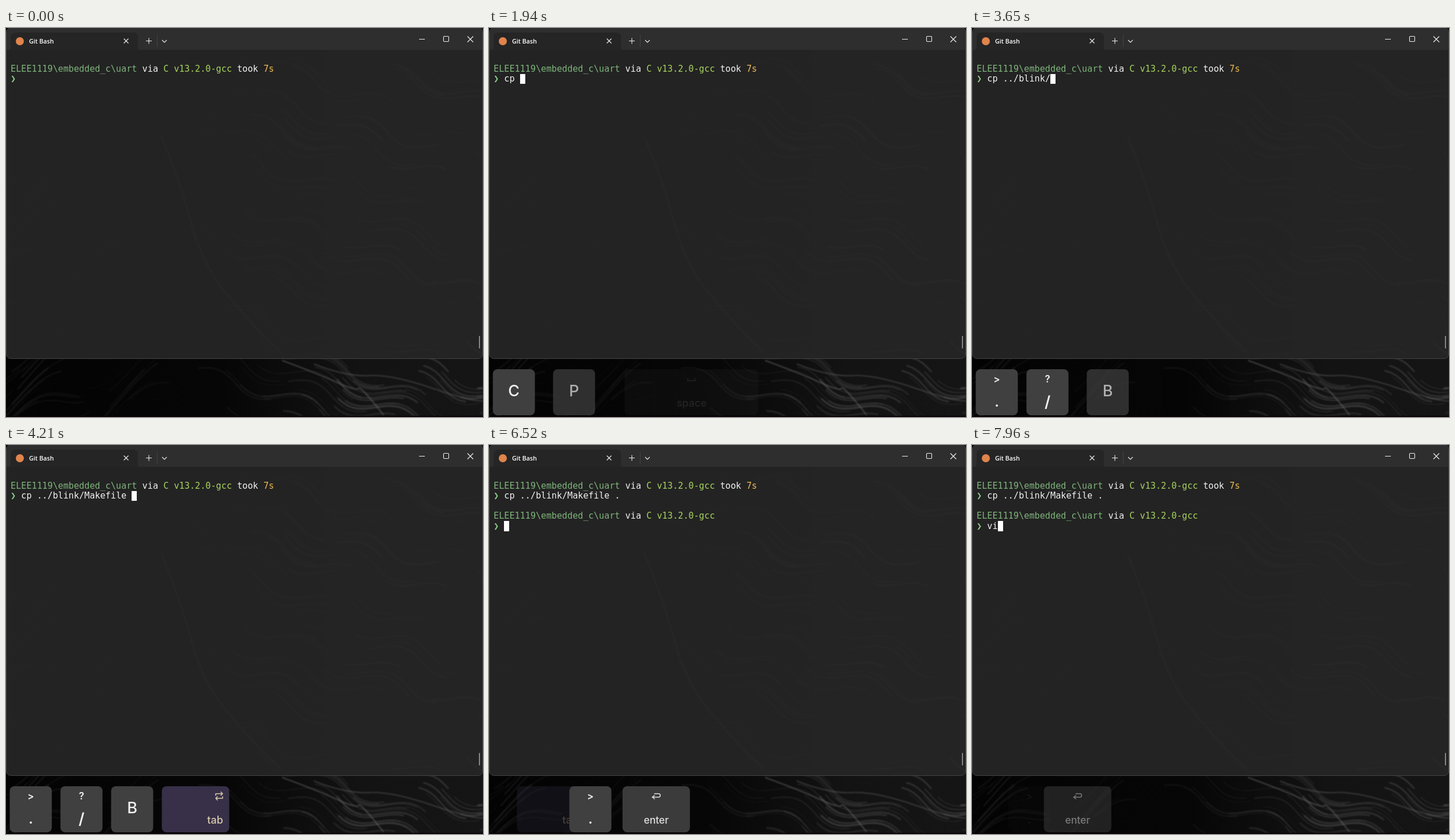
Recreate the animation shown at these times as an HTML page. Size 828 by 676 pixels, loop 8000 ms.

```html
<!DOCTYPE html>
<html lang="en">
<head>
<meta charset="utf-8">
<title>Terminal</title>
<style>
  html, body { margin: 0; width: 100%; height: 100%; overflow: hidden; background: #000; }
  svg { display: block; width: 828px; height: 676px; }
  .mono { font: 15.2px "DejaVu Sans Mono", monospace; white-space: pre; }
  .key { font-family: Inter, sans-serif; font-weight: 500; text-anchor: middle; }
  .line { fill: none; stroke: #f0f0f0; stroke-width: 1.1; }
  .icon { fill: none; stroke-width: 1.5; stroke-linecap: round; stroke-linejoin: round; }
</style>
</head>
<body>
<svg viewBox="0 0 828 676">
  <defs>
    <linearGradient id="sea">
      <stop offset="0" stop-color="#030303"/>
      <stop offset=".45" stop-color="#060606"/>
      <stop offset=".75" stop-color="#131313"/>
      <stop offset="1" stop-color="#151515"/>
    </linearGradient>
    <filter id="soft" x="0" y="0" width="828" height="676" filterUnits="userSpaceOnUse">
      <feGaussianBlur stdDeviation="1.1"/>
    </filter>
  </defs>
  <rect width="828" height="676" fill="url(#sea)"/>
  <g id="waves" fill="none" stroke-linecap="round" filter="url(#soft)"></g>
  <rect y="674" width="828" height="2" fill="#0a0306"/>

  <rect x=".5" y="-.5" width="827" height="575" rx="8" fill="#262626" fill-opacity=".94" stroke="#444"/>
  <path d="M1 38V8Q1 0 9 0H819Q827 0 827 8V38Z" fill="#2e2e2e"/>
  <path d="M4 38Q8 38 8 34V16Q8 8 16 8H221Q229 8 229 16V34Q229 38 233 38Z" fill="#252525"/>
  <circle cx="24" cy="23" r="7" fill="#e0844c"/>
  <text x="40" y="27" fill="#fff" style="font:600 10.7px 'Open Sans',sans-serif">Git Bash</text>
  <path d="M262.5 12V33" stroke="#444"/>
  <g class="line">
    <path d="M204.5 18.5l8 8m0-8l-8 8M243 22.5h10m-5-5v10M271 21l4 4l4-4"/>
    <path d="M717 19.5h10M801 14.5l10 10m0-10l-10 10"/>
    <rect x="759.5" y="14.5" width="9" height="9" rx="1.2"/>
  </g>
  <rect x="821" y="535" width="1.6" height="22" rx=".8" fill="#a0a0a0"/>

  <g id="screen" class="mono"></g>
  <g id="keys" class="key"></g>
</svg>
<script>
const LOOP = 8000, CELL = 9.15, ROW = 17.4, FADE = 300, SLIDE = 60;
const $ = id => document.getElementById(id);

// Wallpaper: seeded flow lines, brighter towards the right
let seed = 29;
const rand = () => (seed = (seed * 16807) % 2147483647) / 2147483647;

function swell(count, top, bottom, strength) {
  let out = '';
  for (let i = 0; i < count; i++) {
    let x = rand() * 860 - 20, y = top + rand() * (bottom - top);
    const width = 0.8 + rand() * 2.4, steps = 7 + Math.floor(rand() * 12);
    const light = Math.max(0.05, Math.min(1, (x - 330) / 260));
    const alpha = strength * (0.25 + 0.75 * light) * (0.4 + 0.6 * rand());
    let d = `M${x.toFixed(1)} ${y.toFixed(1)}`;
    const side = x < 300 ? -1 : 1;
    for (let s = 0; s < steps; s++) {
      const angle = 0.35 + 0.5 * Math.sin(x * 0.035 + y * 0.021);
      x += side * 11 * Math.cos(angle);
      y += 11 * Math.sin(angle);
      d += `L${x.toFixed(1)} ${y.toFixed(1)}`;
    }
    out += `<path d="${d}" stroke="#aaa" stroke-width="${width.toFixed(1)}" opacity="${alpha.toFixed(3)}"/>`;
  }
  return out;
}
$('waves').innerHTML = swell(150, 40, 560, 0.5) + swell(75, 560, 670, 0.26) +
  '<path d="M480 578Q540 600 575 616T612 626T655 672" stroke="#777" stroke-width="2" opacity=".5"/>' +
  '<path d="M535 584Q590 606 630 604T740 626T828 648" stroke="#777" stroke-width="2" opacity=".4"/>' +
  '<path d="M270 190Q300 260 322 340T388 468Q430 520 476 562" stroke="#999" stroke-width="3" opacity=".4"/>';

// Terminal text
const PATH = 'ELEE1119\\embedded_c\\uart';
const COMMAND = [
  [0, ''], [1070, 'c'], [1270, 'cp'], [1400, 'cp '], [2070, 'cp .'], [2140, 'cp ..'],
  [2280, 'cp ../'], [2920, 'cp ../b'], [3190, 'cp ../blink/'], [3720, 'cp ../blink/M'],
  [3790, 'cp ../blink/Makefile '], [5360, 'cp ../blink/Makefile .']
];
const NEXT = [[0, ''], [7680, 'v'], [7820, 'vi']];
const at = (list, t) => list.filter(([time]) => time <= t).pop()[1];
const span = (text, color) => `<tspan fill="${color}">${text}</tspan>`;
const row = (n, content) => `<text x="8" y="${76 + ROW * n}">${content}</text>`;
const heading = took => span(PATH, '#7fb57c') + span(' via ', '#f2f2f2') +
  span('C v13.2.0-gcc', '#a8d45e') + (took ? span(' took ', '#f2f2f2') + span(took, '#efbd52') : '');
const prompt = text => span('❯', '#8ccf8a') + span(' ' + text, '#f2f2f2');

function block(col, line) {
  const y = Math.round(62.6 + ROW * line), bottom = Math.round(62.6 + ROW * (line + 1));
  return `<rect x="${Math.round(8 + CELL * col)}" y="${y}" width="9" height="${bottom - y}" fill="#fff"/>`;
}

function screen(t) {
  const command = at(COMMAND, t);
  let out = row(0, heading('7s')) + row(1, prompt(command));
  if (t < 70) return out;
  if (t < 5690) return out + block(2 + command.length, 1);
  if (t < 5960) return out + block(0, 2);
  const next = at(NEXT, t);
  return out + row(3, heading()) + row(4, prompt(next)) + block(2 + next.length, 4);
}

// Key caps, drawn from their own top-left corner
const GREY = { fill: '#404040', ink: '#f2f2f2' }, PURPLE = { fill: '#373048', ink: '#d9caaa' };
const label = (x, y, size, text, weight = 500) =>
  `<text x="${x}" y="${y}" font-size="${size}" font-weight="${weight}">${text}</text>`;
const icon = (x, d, ink) => `<path class="icon" transform="translate(${x} 17)" stroke="${ink}" d="${d}"/>`;
const letter = text => ({ ...GREY, width: 73, face: label(36.5, 46.5, 27, text) });
const pair = (upper, lower, y, size) =>
  ({ ...GREY, width: 73, face: label(36.5, 23, 17, upper, 600) + label(36.5, y, size, lower, 600) });

const CAPS = {
  c: letter('C'), p: letter('P'), b: letter('B'),
  dot: pair('&gt;', '.', 65, 24),
  slash: pair('?', '/', 66, 27),
  space: { ...GREY, width: 232, face: icon(116, 'M-6.5-1v4h13v-4', GREY.ink) + label(116.5, 65, 18, 'space') },
  enter: { ...GREY, width: 117,
    face: icon(58.5, 'M-3-1l-4 3l4 3M-7 2H4Q7 2 7-1T4-4H-3', GREY.ink) + label(58.5, 65, 17.3, 'enter') },
  tab: { ...PURPLE, width: 117,
    face: icon(99.5, 'M-6-1V-4H6M3-7l3 3l-3 3M6 1V4H-6M-3 1l-3 3l3 3', PURPLE.ink) + label(92.5, 65, 18, 'tab') }
};

// x: slot, start: fade in, leave: fade out, show/end: hard limits, move: [time, new slot]
const PRESSES = [
  { cap: 'c', x: 6, start: 1650, end: 2280 },
  { cap: 'p', x: 94, start: 1745, end: 2280 },
  { cap: 'space', x: 182, start: 1876, end: 2280 },
  { cap: 'dot', x: 6, start: 2525, show: 2620, end: 4270 },
  { cap: 'slash', x: 94, start: 2870, end: 4270 },
  { cap: 'b', x: 182, start: 3455, end: 4270 },
  { cap: 'tab', x: 270, start: 3640, leave: 6330, end: 6870, move: [4270, 6], pulse: 4330 },
  { cap: 'dot', x: 139, start: 5940, show: 5960, leave: 7705, end: LOOP, move: [6870, 6] },
  { cap: 'enter', x: 227, start: 6270, leave: 7810, end: LOOP, move: [6870, 94] }
];

const ease = age => {
  const p = Math.max(0, Math.min(1, age / FADE));
  return p * p * (3 - 2 * p);
};

function drawKey(press, t) {
  const { cap, x, start, show = start, leave = Infinity, end, move, pulse } = press;
  const level = ease(t - start) * (1 - ease(t - leave));
  if (t < show || t >= end || level <= 0) return '';
  const { width, fill, ink, face } = CAPS[cap];
  const left = (move && t >= move[0] ? move[1] : x) + SLIDE * (1 - level) + 0.5;
  const beat = (t - pulse) / 270;
  const scale = beat > 0 && beat < 1 ? 1 + 0.02 * Math.sin(Math.PI * beat) : 1;
  const cx = width / 2;
  return `<g opacity="${level}" fill="${ink}" transform="translate(${left + cx} 633) scale(${scale}) translate(${-cx} -40)">` +
    `<rect width="${width}" height="80" rx="8" fill="${fill}"/>${face}</g>`;
}

const origin = performance.now();
function render() {
  const t = (performance.now() - origin) % LOOP;
  $('screen').innerHTML = screen(t);
  $('keys').innerHTML = PRESSES.map(press => drawKey(press, t)).join('');
  requestAnimationFrame(render);
}
render();
</script>
</body>
</html>
```
